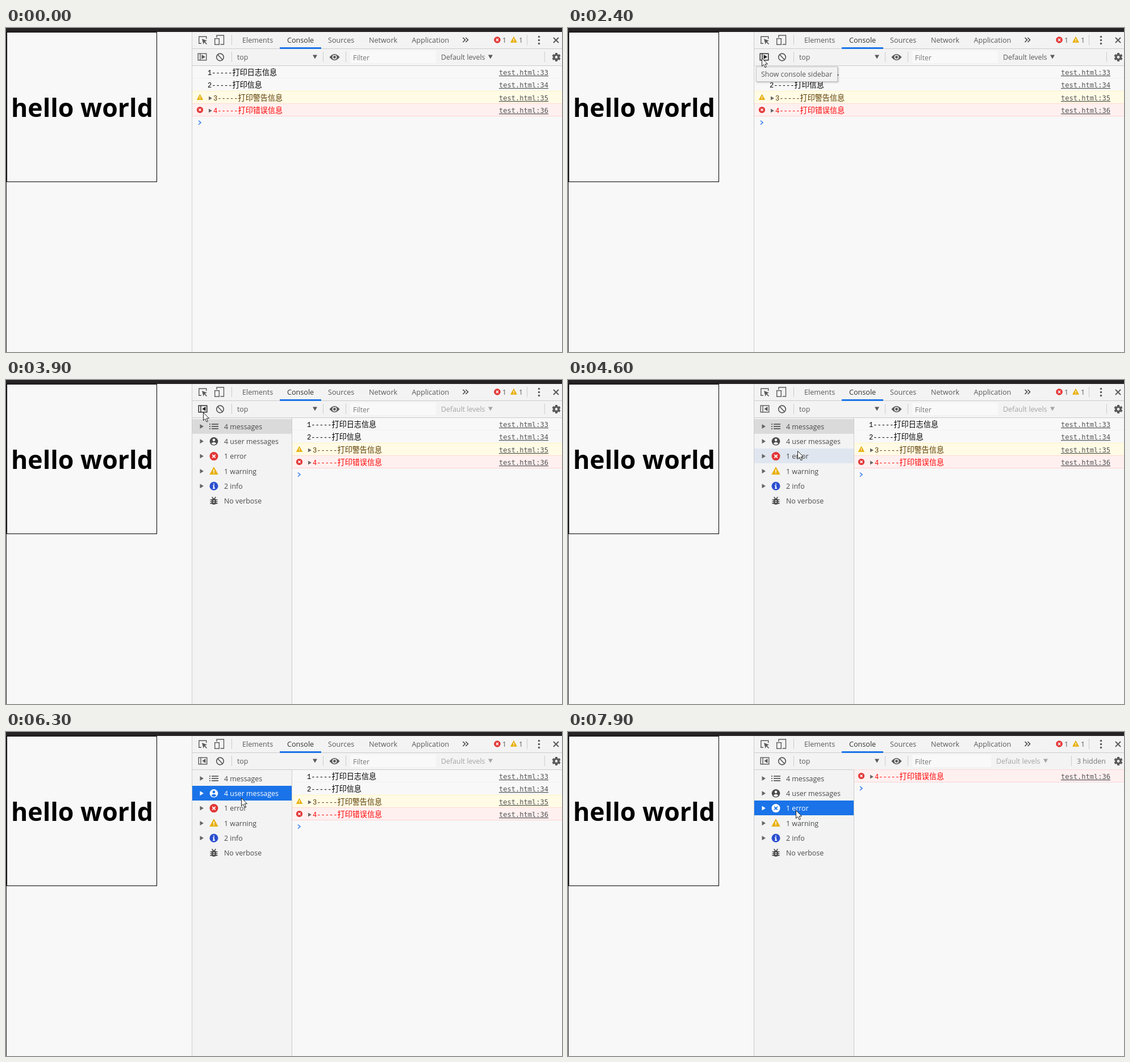
An HTML page for the animation above (8 s loop, 979x572 px).

```html
<!DOCTYPE html>
<html lang="en">
<head>
<meta charset="utf-8">
<title>Console sidebar</title>
<style>
html, body { margin: 0; width: 100%; height: 100%; overflow: hidden; background: #f8f8f8; }
svg { display: block; }
text { font: 12.4px "Open Sans", "Noto Sans", sans-serif; white-space: pre; }
.title { font-size: 44.6px; font-weight: 700; }
.tab { font-size: 12.6px; }
.log { font: 12.1px "Liberation Mono", monospace; }
.cjk { font: 13.1px "Noto Sans CJK SC", "Noto Sans CJK", sans-serif; }
.link { font: 12.05px "DejaVu Sans Mono", monospace; text-decoration: underline; }
.tip { filter: drop-shadow(1px 1px 1.5px #0004); }
</style>
</head>
<body>
<svg id="stage" width="979" height="572" viewBox="0 0 979 572"></svg>
<script>
const stage = document.getElementById('stage');
const LOOP = 8000, STEP = 100;
const GREY = '#5a5a5a', BLUE = '#1a73e8', RED = '#e23636', AMBER = '#e8b00c', EDGE = '#ccc';

// Pointer moves: first step, last step, x, y
const moves = [
  [700, 700, 964, 44], [800, 900, 742, 272], [1000, 1000, 711, 266],
  [1200, 1400, 639, 117], [1600, 1700, 499, 90], [1900, 2000, 350, 69],
  [2200, 2300, 341, 53], [3900, 3900, 347, 57], [4000, 4600, 404, 125],
  [4900, 5100, 414, 113], [6300, 6600, 415, 124], [7000, 7000, 400, 130],
  [7900, 7900, 401, 138]
];
// Tooltips: from, to, x, y, width, label
const tips = [
  [2400, 3300, 331, 68, 144, 'Show console sidebar'],
  [5300, 5600, 421, 131, 113, '4 user messages'],
  [6900, 7100, 422, 133, 59, '1 error']
];
const OPEN = 3300, PICK_USER = 5600, PICK_ERROR = 7100;

const rect = (x, y, w, h, fill, more = '') =>
  `<rect x="${x}" y="${y}" width="${w}" height="${h}" fill="${fill}" ${more}/>`;
const text = (x, y, s, fill = GREY, cls = '') =>
  `<text x="${x}" y="${y}" fill="${fill}" class="${cls}">${s}</text>`;
const path = (d, fill) => `<path d="${d}" fill="${fill}"/>`;
const line = (d, color, w = 1) => `<path d="${d}" fill="none" stroke="${color}" stroke-width="${w}"/>`;
const disc = (x, y, r, fill) => `<circle cx="${x}" cy="${y}" r="${r}" fill="${fill}"/>`;
const ring = (x, y, r, color, w) =>
  `<circle cx="${x}" cy="${y}" r="${r}" fill="none" stroke="${color}" stroke-width="${w}"/>`;
const divider = (x, y) => line(`M${x}.5 ${y}v18`, EDGE);
const down = (x, y, color) => path(`M${x} ${y}h8l-4 7z`, color);
const play = (x, y, color, s = 1) => path(`M${x} ${y - 4 * s}l${6.5 * s} ${4 * s}l${-6.5 * s} ${4 * s}z`, color);

function errorIcon(x, y, r, fill = RED, mark = '#fff') {
  const d = r * .37;
  return disc(x, y, r, fill) +
    line(`M${x - d} ${y - d}l${2 * d} ${2 * d}m0 ${-2 * d}l${-2 * d} ${2 * d}`, mark, r * .25);
}

function warnIcon(x, y, r) {
  return `<path d="M${x} ${y - r}l${r} ${r * 1.8}h${-2 * r}z" fill="${AMBER}" stroke="${AMBER}" stroke-linejoin="round"/>` +
    line(`M${x} ${y - r * .4}v${r * .65}m0 ${r * .15}v${r * .2}`, '#fff', r * .23);
}

function gear(x, y) {
  let teeth = '';
  for (let i = 0; i < 6; i++)
    teeth += rect(x - 2, y - 7.5, 4, 5, GREY, `transform="rotate(${i * 60} ${x} ${y})"`);
  return teeth + ring(x, y, 4.1, GREY, 3.4);
}

function pointerAt(t) {
  let x, y;
  for (const [from, to, nx, ny] of moves) {
    if (t < from) break;
    const k = Math.min(1, (t - from + STEP) / (to - from + STEP));
    x = k < 1 ? x + (nx - x) * k : nx;
    y = k < 1 ? y + (ny - y) * k : ny;
  }
  return x === undefined ? null : { x, y };
}

function page() {
  return rect(0, 0, 979, 572, '#f8f8f8') + rect(0, 0, 979, 7, '#252324') +
    rect(0, 7, 1, 565, '#222') +
    rect(1.5, 7.5, 264, 264, 'none', 'stroke="#000"') +
    text(9, 156.5, 'hello world', '#000', 'title');
}

function tabs() {
  const names = [[416, 'Elements'], [495, 'Console'], [567, 'Sources'], [639, 'Network'], [714.5, 'Application']];
  return rect(328, 7, 651, 59, '#f3f3f3') +
    line('M328 36.5h651M328 66.5h651', EDGE) + rect(482, 34, 73, 3, BLUE) +
    names.map(([x, s]) => text(x, 26, s, s === 'Console' ? '#333' : GREY, 'tab')).join('') +
    line('M344 27.2h-4.2v-12h13v4', GREY, 1.4) +
    path('M345 19l9 3.6l-3.7 1.5l3.8 3.8l-1.2 1.2l-3.8 -3.8l-1.5 3.6z', GREY) +
    line('M371 17v-4h12.5v16h-6', GREY, 1.4) + rect(367.7, 18.7, 7.6, 10.6, '#f3f3f3', `stroke="${GREY}" stroke-width="1.4"`) +
    divider(397, 12) + line('M804.5 17l4 4l-4 4m5 -8l4 4l-4 4', '#444', 1.6) +
    errorIcon(865, 21, 5.8) + text(874, 26, '1') + warnIcon(894, 21, 5.3) + text(903, 26, '1') +
    divider(917, 12) + [15.5, 21.5, 27.5].map(y => disc(938.5, y, 1.8, GREY)).join('') +
    line('M964 17l9 9m0 -9l-9 9', GREY, 2);
}

function toolbar(t, hover) {
  const open = t >= OPEN, hidden = t >= PICK_ERROR;
  const ink = hover ? '#222' : GREY, levels = open ? '#a5a5a5' : GREY;
  const shift = hidden ? -12 : 0, x = open ? 338.5 : 337.5;
  const icon = rect(x + .7, 45.2, 14.6, 11.6, 'none', `stroke="${ink}" stroke-width="1.4"`) +
    line(`M${x + 4.5} 45v12`, ink, 1.4) +
    (open ? path(`M${x + 13} 47v8l-6 -4z`, ink) : play(x + 7, 51, ink));
  return icon + ring(377, 51.5, 6.3, GREY, 1.7) + line('M372.7 47l8.6 9', GREY, 1.7) +
    divider(397, 42) + text(407, 56, 'top') + down(540, 47.5, GREY) + divider(558, 42) +
    path('M569.5 51.5q9 -11 18 0q-9 11 -18 0z', GREY) + ring(578.5, 51.5, 3.2, '#f3f3f3', 1.5) +
    divider(598, 42) + rect(606, 40, 151 + shift, 22, '#f9f9f9') + text(611, 56.5, 'Filter', '#777') +
    text(766 + shift, 56, 'Default levels', levels) + down(849 + shift, 47.5, levels) +
    (hidden ? divider(886, 42) + text(896, 56, '3 hidden', '#777') : divider(948, 42)) +
    gear(969, 51.5);
}

function messages(t) {
  const x = t >= OPEN ? 503 : 328, only = t >= PICK_ERROR;
  const log = (tx, y, num, words, color) =>
    `<text x="${tx}" y="${y}" fill="${color}" class="log">${num}-----<tspan class="cjk">${words}</tspan></text>`;
  const link = (y, n) => text(868, y, 'test.html:' + n, '#555', 'link');
  const row = (y, fill, edge) => rect(x, y, 979 - x, 22, fill) + line(`M${x} ${y + 21.5}H979`, edge);
  const errorRow = y => row(y, '#fff0f0', '#ffd2d2') + line(`M${x} ${y - .5}H979`, '#ffd8d8') +
    errorIcon(x + 13.5, y + 10.5, 5.6) + play(x + 29, y + 12, '#666', .9) +
    log(x + 37, y + 16, 4, '打印错误信息', '#f00') + link(y + 16, 36);
  const prompt = y => line(`M${x + 11} ${y - 3.5}l4 3.5l-4 3.5`, '#367cf1', 1.6);
  if (only) return errorRow(67) + prompt(99.5);
  return row(67, '#f8f8f8', '#f0f0f0') + log(x + 27, 83, 1, '打印日志信息', '#000') + link(83, 33) +
    log(x + 27, 105, 2, '打印信息', '#000') + link(105, 34) +
    row(112, '#fffbe5', '#fff0b8') + line(`M${x} 111.5H979`, '#fff5c2') +
    warnIcon(x + 13.5, 122.5, 5) + play(x + 29, 124, '#666', .9) +
    log(x + 37, 128, 3, '打印警告信息', '#5c3c00') + link(128, 35) +
    errorRow(134) + prompt(167);
}

const rowIcons = [
  (y, c) => [-4, 0, 4].map(d => rect(358, y + d - .8, 2, 1.6, c) + rect(362, y + d - .8, 12, 1.6, c)).join(''),
  (y, c, bg) => disc(366, y, 7.3, c) + disc(366, y - 2.4, 2.3, bg) + path(`M361.5 ${y + 3.7}q4.5 -4.6 9 0q-4.5 4.4 -9 0z`, bg),
  (y, c, bg, on) => errorIcon(366, y, 7.5, on ? '#fff' : RED, on ? bg : '#fff'),
  y => warnIcon(366, y, 7),
  y => disc(366, y, 7.5, '#2b4fcf') + line(`M366 ${y - 4.5}v2m-2 2h2v4.5m-2 0h4`, '#fff', 1.8),
  (y, c, bg) => rect(362, y - 4.5, 8, 11, c, 'rx="4"') +
    line(`M359.5 ${y - 2}h13m-13 3.2h13m-13 3.2h13M362.5 ${y - 7}l2.5 2.5m4.5 -2.5l-2.5 2.5`, c, 1.6) +
    line(`M364.3 ${y - .3}h3.4m-3.4 3h3.4`, bg, 1.3)
];

function sidebar(t, pointer) {
  const names = ['4 messages', '4 user messages', '1 error', '1 warning', '2 info', 'No verbose'];
  const picked = t >= PICK_ERROR ? 2 : t >= PICK_USER ? 1 : 0;
  const hovered = pointer.x < 503 ? Math.floor((pointer.y - 69) / 26.2) : -1;
  const rows = names.map((name, i) => {
    const top = Math.round(69 + i * 26.2), mid = 82 + i * 26.3;
    const on = i === picked && picked > 0;
    const bg = on ? BLUE : i === picked ? '#dadada' : i === hovered ? '#dfe6f0' : '#f3f3f3';
    const ink = on ? '#fff' : '#4a4a4a';
    return rect(328, top, 175, 26, bg) + (i < 5 ? play(341.5, mid, on ? '#fff' : '#666') : '') +
      rowIcons[i](mid, ink, bg, on) + text(384, mid + 4.7, name, ink);
  });
  return rect(328, 67, 175, 505, '#f3f3f3') + rows.join('') + line('M503.5 67v505', EDGE);
}

function tooltip(t) {
  return tips.filter(([from, to]) => t >= from && t < to).map(([, , x, y, w, label]) =>
    `<g class="tip">${rect(x + .5, y + .5, w - 1, 26, '#f2f2f2', 'stroke="#c4c4c4"')}</g>` +
    text(x + 9, y + 18, label, '#575757')).join('');
}

function arrow({ x, y }) {
  return `<path transform="translate(${Math.round(x) + .5} ${Math.round(y) + .5})" fill="#fff" stroke="#222"
    d="M0 0v14l3.2 -3l2.4 5.4l2.3 -1l-2.3 -5.2h4.4z"/>`;
}

function scene(t) {
  const pointer = pointerAt(t);
  const hover = pointer && pointer.x < 356 && pointer.y < 62;
  return page() + tabs() + toolbar(t, hover) + messages(t) +
    (t >= OPEN ? sidebar(t, pointer) : '') + line('M327.5 7v565', EDGE) +
    tooltip(t) + (pointer ? arrow(pointer) : '');
}

const start = performance.now();
let shown = -1;
function tick() {
  const t = Math.floor((performance.now() - start) % LOOP / STEP) * STEP;
  if (t !== shown) stage.innerHTML = scene(shown = t);
  requestAnimationFrame(tick);
}
tick();
</script>
</body>
</html>
```
